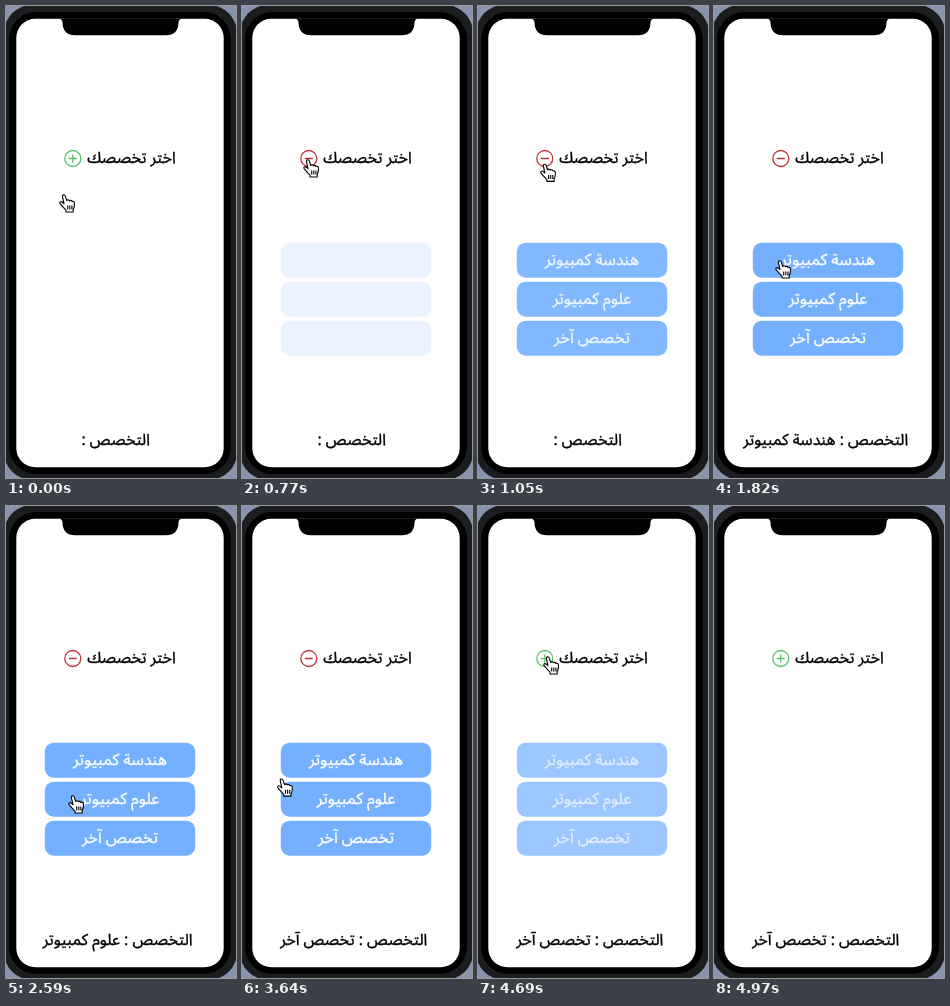
An HTML page for the animation above (5040 ms loop, 230 by 472 pixels).

```html
<!DOCTYPE html>
<html lang="ar">
<head>
<meta charset="utf-8">
<style>
html, body { margin: 0; width: 100%; height: 100%; overflow: hidden; }
svg { display: block; width: 100vw; height: 100vh; }
text {
  font-family: "Noto Sans Arabic", "Noto Sans", "DejaVu Sans", sans-serif;
  font-size: 15.8px; text-anchor: middle; direction: rtl;
  fill: #000; stroke: #000; stroke-width: .35px;
}
#menu text { font-size: 16.1px; fill: #fff; stroke: #fff; }
</style>
</head>
<body>
<svg viewBox="0 0 230 472">
  <rect width="230" height="472" fill="#8794ab"/>
  <rect x="-2" y="-1" width="233" height="475" rx="28" fill="#1c1d1f"/>
  <rect x="3" y="6" width="222" height="462" rx="27"/>
  <rect x="10.300" y="12.700" width="207.400" height="448.500" rx="19" fill="#fff"/>
  <path d="M53 12.500Q56.500 13 56.500 17Q57 29.200 69 29.200H160Q172 29.200 172.500 17Q172.500 13 176 12.500Z"/>

  <text x="125.500" y="157">اختر تخصصك</text>
  <g id="icon" fill="none" stroke-width="1.300" stroke-linecap="round">
    <circle cx="66.800" cy="152.500" r="8"/>
    <path d="M63.300 152.500h7"/>
    <path id="upright" d="M66.800 149v7"/>
  </g>
  <g id="menu"></g>
  <text id="label" y="438.500"></text>
  <path id="hand" fill="#fff" stroke="#000" stroke-width="1.100" stroke-linejoin="round"
    d="M3.500 2.800C2.900 .5 5.600 .1 6.300 2.200L7.700 6.500C8.300 5.400 10 5.500 10.400 6.800C11.200 6 12.700 6.300 13 7.500C14 7 15.400 7.600 15.500 9C15.700 12 15.300 13.700 14.200 15.500V18H7V16.200C5 14.300 3 12 1.100 9.700C.2 8.300 1.600 7 3 8L5 9.700ZM8.700 11.500v4M10.800 11.500v4M12.900 11.500v4"/>
</svg>
<script>
const LOOP = 5040, STEP = 70, OPEN = 700, CLOSE = 4550;
const options = ["هندسة كمبيوتر", "علوم كمبيوتر", "تخصص آخر"];
const pickTimes = [1820, 2590, 3290];
const home = { x: 53, y: 188 };

// Each move starts where the last one ended; bend is an optional curve control point.
const moves = [
  { from: 0, to: 350, x: 61, y: 153 },
  { from: 1000, to: 1400, x: 61, y: 254, bend: { x: 72, y: 204 } },
  { from: 1890, to: 2310, x: 62, y: 289 },
  { from: 2660, to: 3220, x: 62, y: 332 },
  { from: 3430, to: 3990, x: 67, y: 110, bend: { x: -2, y: 245 } },
  { from: 3990, to: 4200, x: 65, y: 150 },
  { from: 4690, to: 4900, x: 9, y: 152 }
];

const el = id => document.getElementById(id);
const lerp = (a, b, k) => a + (b - a) * k;
const mix = (p, q, k) => ({ x: lerp(p.x, q.x, k), y: lerp(p.y, q.y, k) });

function ease(t, from, to) {
  const k = Math.min(1, Math.max(0, (t - from) / (to - from)));
  return k * k * (3 - 2 * k);
}

function pointerAt(t) {
  return moves.reduce((p, move) => {
    const k = ease(t, move.from, move.to);
    const bend = move.bend || mix(p, move, .5);
    return mix(mix(p, bend, k), mix(bend, move, k), k);
  }, home);
}

function show(node, visible) {
  node.setAttribute("visibility", visible ? "visible" : "hidden");
}

el("menu").innerHTML = options.map((name, i) => {
  const y = 236.7 + 39 * i;
  return `<rect x="38.800" y="${y}" width="150.400" height="35" rx="9" fill="#74b0ff"/>
    <text x="114" y="${y + 22.2}">${name}</text>`;
}).join("");
const optionLabels = el("menu").querySelectorAll("text");

function render(time) {
  const t = Math.floor(time % LOOP / STEP) * STEP;
  const open = t > OPEN && t < CLOSE;
  el("icon").setAttribute("stroke", open ? "#c0303c" : "#55c468");
  show(el("upright"), !open);

  const opacity = open ? ease(t, OPEN - 50, OPEN + 450) : t < CLOSE ? 0 : 1 - ease(t, CLOSE, CLOSE + 400);
  el("menu").setAttribute("opacity", opacity);
  optionLabels.forEach(label => label.setAttribute("opacity", opacity));

  const picks = pickTimes.filter(pick => t >= pick).length;
  el("label").textContent = "التخصص : " + (options[picks - 1] || "");
  el("label").setAttribute("x", picks ? 111.7 : 109.7);

  const { x, y } = pointerAt(t);
  el("hand").setAttribute("transform", `translate(${x} ${y})`);
  show(el("hand"), t <= 4900);
}

const start = performance.now();
function tick() {
  render(performance.now() - start);
  requestAnimationFrame(tick);
}
render(0);
requestAnimationFrame(tick);
</script>
</body>
</html>
```
